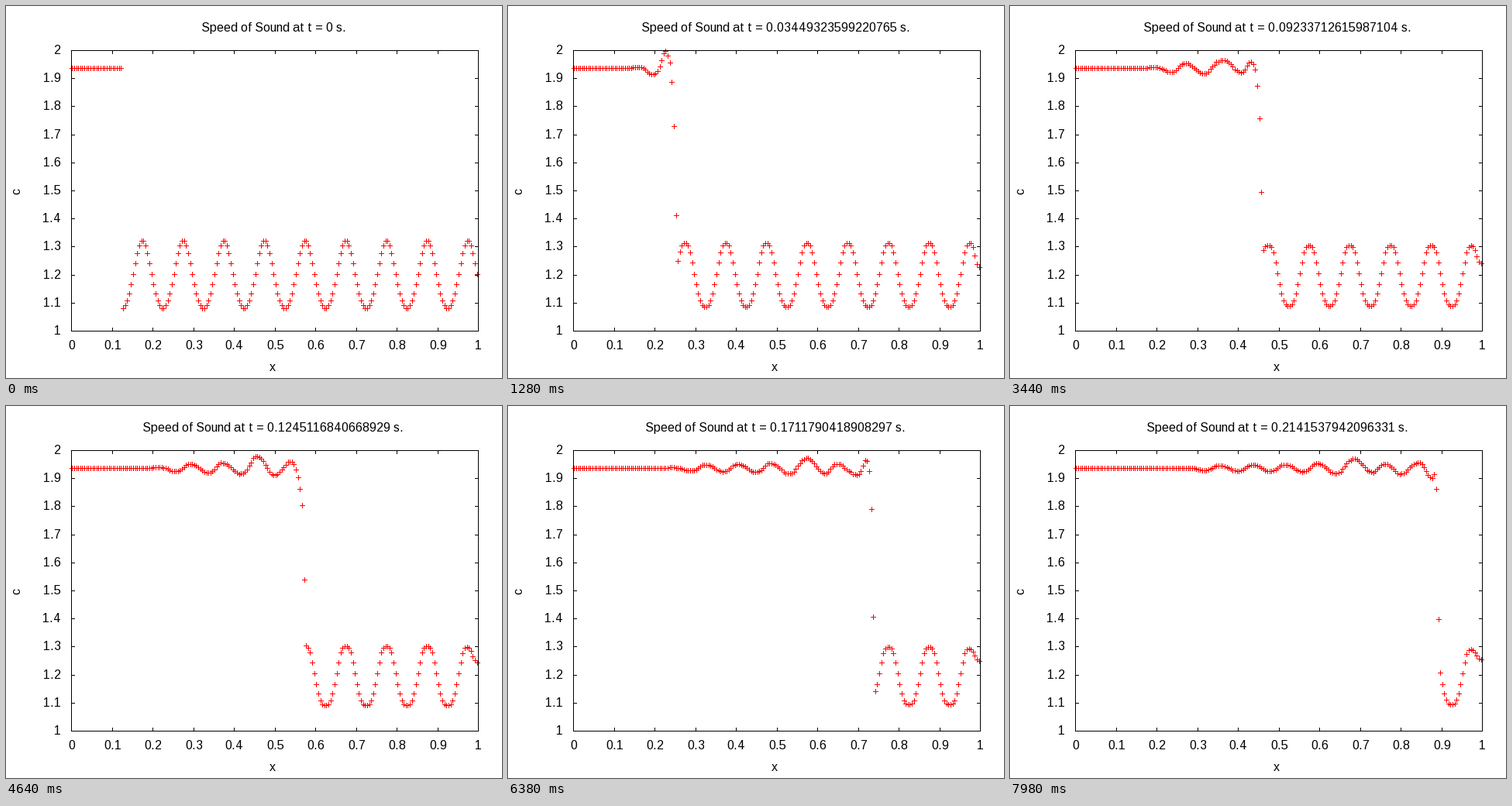
Recreate the animation shown at these times as a matplotlib script. Size 640 by 480 pixels, loop 8 s.

```python
import matplotlib.pyplot as plt
import numpy as np
from matplotlib.animation import FuncAnimation
from matplotlib.collections import PolyCollection

W, H, DPI = 640, 480, 80
LEFT, RIGHT, TOP, BOTTOM = 84, 609, 57, 419
FRAMES, INTERVAL = 400, 20
CELLS, GAMMA = 200, 1.4
DX = 1 / CELLS
THETA = 1.7           # limiter sharpness, 1 (diffusive) to 2 (sharp)
SETTLED = 64          # from here on the vertical range stays at 1..2

# Simulated time at a few steps; the step size is nearly constant between them.
STEPS = [0, 64, 109, 172, 232, 319, 399]
TIMES = [0, 0.03449323599220765, 0.05858128722316171, 0.09233712615987104,
         0.1245116840668929, 0.1711790418908297, 0.2141537942096331]

plt.rcParams.update({"font.family": "Liberation Sans",
                     "text.hinting": "force_autohint",
                     "text.hinting_factor": 1})


# ---- gas dynamics: a shock running into a sinusoidal density field ----

def to_conserved(w):
    rho, u, p = w
    return np.array([rho, rho * u, p / (GAMMA - 1) + 0.5 * rho * u * u])


def to_primitive(q):
    rho, mom, energy = q
    u = mom / rho
    return np.array([rho, u, (GAMMA - 1) * (energy - 0.5 * mom * u)])


def sound_speed(w):
    return np.sqrt(GAMMA * w[2] / w[0])


def flux(w, q):
    rho, u, p = w
    return np.array([q[1], q[1] * u + p, (q[2] + p) * u])


def limited_slope(w):
    d = np.diff(w)
    a, b = d[:, :-1], d[:, 1:]
    size = np.minimum(THETA * np.minimum(abs(a), abs(b)), abs(a + b) / 2)
    return np.where(a * b > 0, np.sign(a) * size, 0)


def rate(q):
    w = np.pad(to_primitive(q), ((0, 0), (2, 2)), mode="edge")
    s = limited_slope(w)
    wl = w[:, 1:-2] + s[:, :-1] / 2
    wr = w[:, 2:-1] - s[:, 1:] / 2
    ql, qr = to_conserved(wl), to_conserved(wr)
    speed = np.maximum(abs(wl[1]) + sound_speed(wl),
                       abs(wr[1]) + sound_speed(wr))
    f = (flux(wl, ql) + flux(wr, qr) - speed * (qr - ql)) / 2
    return -np.diff(f) / DX


def simulate(x, times):
    behind = x < 0.125
    q = to_conserved(np.array([
        np.where(behind, 3.857143, 1 + 0.2 * np.sin(20 * np.pi * x)),
        np.where(behind, 2.629369, 0.0),
        np.where(behind, 10.33333, 1.0)]))
    history = [sound_speed(to_primitive(q))]
    for dt in np.diff(times):
        q1 = q + dt * rate(q)
        q = (q + q1 + dt * rate(q1)) / 2
        history.append(sound_speed(to_primitive(q)))
    return history


x = (np.arange(CELLS) + 0.5) * DX
times = np.interp(np.arange(FRAMES), STEPS, TIMES)
speeds = simulate(x, times)


# ---- drawing in pixel coordinates, y downwards ----

def boxes(x0, y0, x1, y1):
    """Pixel rectangles, both corners included."""
    x0, y0, x1, y1 = np.broadcast_arrays(x0, y0, x1, y1)
    return np.stack([np.stack([x0, y0], -1), np.stack([x1 + 1, y0], -1),
                     np.stack([x1 + 1, y1 + 1], -1),
                     np.stack([x0, y1 + 1], -1)], axis=-2).astype(float)


def nearest(v):
    return np.floor(v + 0.5 + 1e-9)


def x_pixel(v):
    return nearest(LEFT + (RIGHT - LEFT) * v)


def y_pixel(v, top):
    return nearest(BOTTOM - (BOTTOM - TOP) * (v - 1) / (top - 1))


fig = plt.figure(figsize=(W / DPI, H / DPI), dpi=DPI, facecolor="white")
ax = fig.add_axes([0, 0, 1, 1])
ax.set_xlim(0, W)
ax.set_ylim(H, 0)
ax.axis("off")


def label(px, py, text, **kw):
    kw = {"ha": "center", "va": "baseline", **kw}
    return ax.text(px, py, text, fontsize=16 * 72 / DPI, color="black", **kw)


def shapes(color, z):
    c = PolyCollection([], facecolors=color, edgecolors="none",
                       linewidths=0, zorder=z)
    c.set_snap(False)
    ax.add_collection(c, autolim=False)
    return c


points = shapes("#ff0000", 2)
frame_lines = shapes("#000000", 3)

x_ticks = np.arange(11) / 10
y_ticks = 1 + np.arange(12) / 10
for v in x_ticks:
    label(x_pixel(v) + 0.5, 443, f"{v:g}")
y_labels = [label(71, 0, f"{v:g}", ha="right") for v in y_ticks]
label(344, 471, "x")
label(14, 239, "c", rotation=90, va="center")
title = label(345, 33, "")


def border(top):
    tx = x_pixel(x_ticks)
    ty = y_pixel(y_ticks[y_ticks < top + 0.01], top)
    return np.concatenate([
        boxes([LEFT, LEFT, LEFT, RIGHT], [TOP, BOTTOM, TOP, TOP],
              [RIGHT, RIGHT, LEFT, RIGHT], [TOP, BOTTOM, BOTTOM, BOTTOM]),
        boxes(tx, TOP, tx, TOP + 4), boxes(tx, BOTTOM - 4, tx, BOTTOM),
        boxes(LEFT, ty, LEFT + 4, ty), boxes(RIGHT - 4, ty, RIGHT, ty)])


def draw(n):
    c = speeds[n]
    top = 2.1 if n < SETTLED and c.max() > 2 else 2.0
    px, py = x_pixel(x), y_pixel(c, top)
    points.set_verts(np.concatenate([boxes(px - 3, py, px + 3, py),
                                     boxes(px, py - 3, px, py + 3)]))
    frame_lines.set_verts(border(top))
    for v, text in zip(y_ticks, y_labels):
        text.set_y(y_pixel(v, top) + 5)
        text.set_visible(v < top + 0.01)
    t = repr(float(times[n])) if n else "0"
    title.set_text(f"Speed of Sound at t = {t} s.")
    return [points, frame_lines, title, *y_labels]


anim = FuncAnimation(fig, draw, frames=FRAMES, interval=INTERVAL,
                     init_func=lambda: draw(0), repeat=True, repeat_delay=0,
                     blit=False)
plt.show()
```
